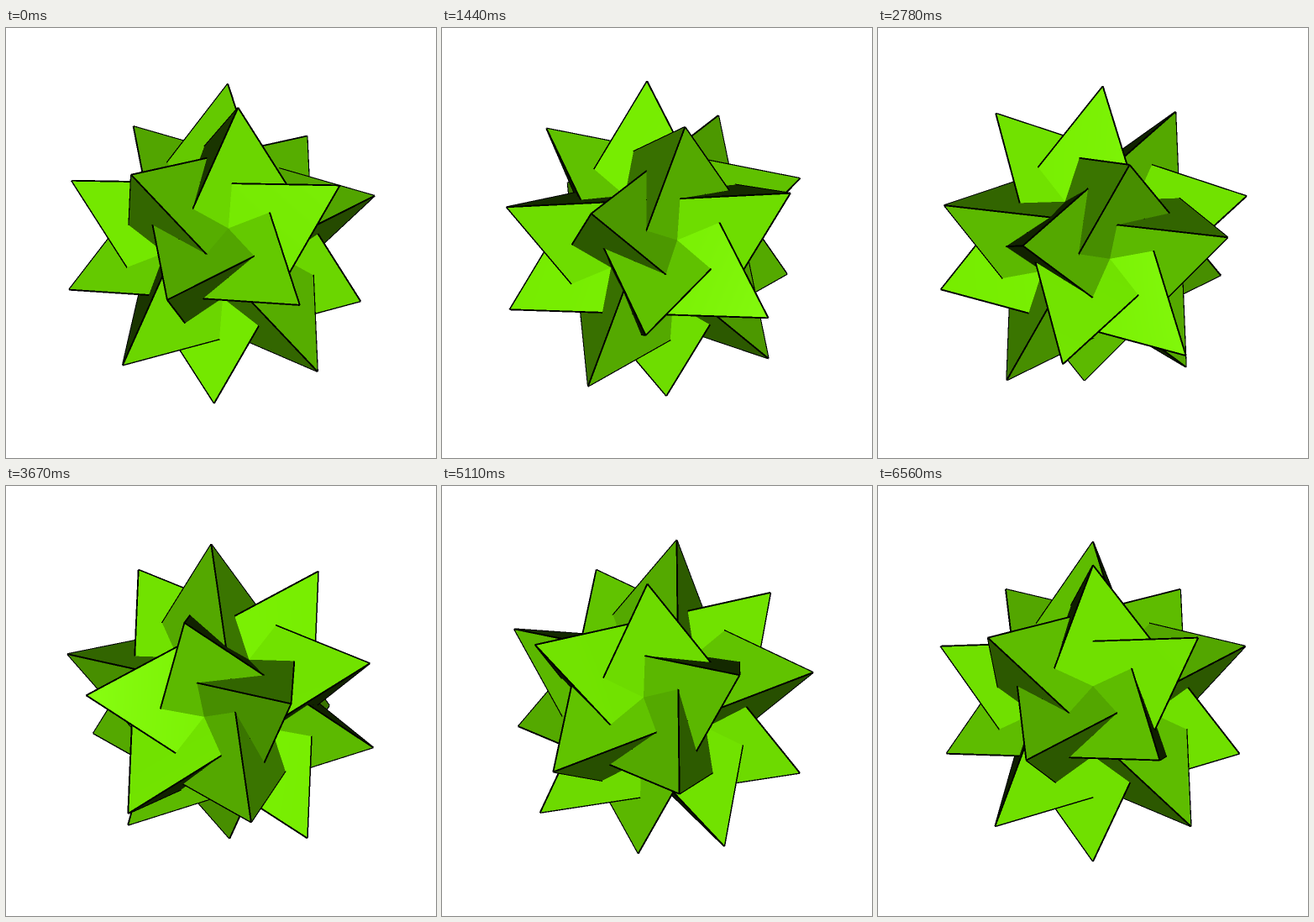
These frames come from a looping animation (512x512 px, 6670 ms). An HTML page with a canvas:

```html
<!DOCTYPE html>
<html lang="en">
<head>
<meta charset="utf-8">
<title>Compound of five tetrahedra</title>
<style>
  html, body { margin: 0; width: 100%; height: 100%; overflow: hidden; background: #fff; }
  canvas { display: block; width: 512px; height: 512px; }
</style>
</head>
<body>
<canvas id="stage" width="512" height="512"></canvas>
<script>
const SIZE = 512, SAMPLES = 2, WIDE = SIZE * SAMPLES;
const LOOP = 6670, STEPS = 60, STEPS_PER_MS = 0.009;
const RADIUS = 190.5, DISTANCE = 6.06, FOCAL = RADIUS * DISTANCE;
const LINE_HALF = 0.95, LINE_BIAS = 1.0002;
const DEG = Math.PI / 180, TILT = 25.18 * DEG, LEAN = 13.283 * DEG;

const stage = document.getElementById('stage').getContext('2d');
const buffer = document.createElement('canvas');
buffer.width = buffer.height = WIDE;
const bufferContext = buffer.getContext('2d');
const image = bufferContext.createImageData(WIDE, WIDE);
const pixels = new Uint32Array(image.data.buffer);
const depth = new Float32Array(WIDE * WIDE);

// The 20 corners lie on four rings around a fivefold axis; each tetrahedron takes one from each.
const high = Math.sqrt((5 + 2 * Math.sqrt(5)) / 15);
const low = Math.sqrt((5 - 2 * Math.sqrt(5)) / 15);
const corners = [[high, 0], [low, -144], [-low, 108], [-high, -36]];

// Corner as [across, outward, along], where "along" is the spin axis.
function corner(height, degrees) {
  const ring = Math.sqrt(1 - height * height);
  const side = ring * Math.sin(degrees * DEG), up = ring * Math.cos(degrees * DEG);
  return [
    side,
    height * Math.cos(LEAN) + up * Math.sin(LEAN),
    up * Math.cos(LEAN) - height * Math.sin(LEAN)
  ];
}

const tetrahedra = [0, 1, 2, 3, 4].map(turn =>
  corners.map(([height, degrees]) => corner(height, degrees + 72 * turn)));

// Spin, then tilt into view space: x right, y down, z towards the viewer.
function rotate([across, outward, along], spin) {
  const c = Math.cos(spin), s = Math.sin(spin);
  const q = c * outward - s * across;
  return [
    c * across + s * outward,
    -(along * Math.cos(TILT) + q * Math.sin(TILT)),
    q * Math.cos(TILT) - along * Math.sin(TILT)
  ];
}

// Screen x and y from the centre, plus nearness, which is linear across the screen.
function project([x, y, z]) {
  const near = FOCAL / (DISTANCE - z);
  return [x * near, y * near, near];
}

const toPixel = v => (v + SIZE / 2) * SAMPLES - 0.5;
const toScreen = p => (p + 0.5) / SAMPLES - SIZE / 2;

// Depth-tested fill of a convex polygon; nearness = a*x + b*y + c.
function fillConvex(points, [a, b, c], colorAt) {
  const ys = points.map(p => toPixel(p[1]));
  const first = Math.max(0, Math.ceil(Math.min(...ys)));
  const last = Math.min(WIDE - 1, Math.floor(Math.max(...ys)));
  for (let row = first; row <= last; row++) {
    const y = toScreen(row);
    let left = Infinity, right = -Infinity;
    points.forEach((p, i) => {
      const q = points[(i + 1) % points.length];
      if ((p[1] <= y) === (q[1] <= y)) return;
      const x = p[0] + (q[0] - p[0]) * (y - p[1]) / (q[1] - p[1]);
      left = Math.min(left, x);
      right = Math.max(right, x);
    });
    if (left > right) continue;
    const end = Math.min(WIDE - 1, Math.floor(toPixel(right)));
    for (let col = Math.max(0, Math.ceil(toPixel(left))); col <= end; col++) {
      const x = toScreen(col), near = a * x + b * y + c, at = row * WIDE + col;
      if (near > depth[at]) {
        depth[at] = near;
        pixels[at] = colorAt(x, y);
      }
    }
  }
}

function pack(diffuse, specular) {
  const r = Math.min(255, diffuse / 2 + specular);
  const g = Math.min(255, diffuse + specular);
  return (0xff000000 | specular << 16 | g << 8 | r) >>> 0;
}

// Green surface lit from the viewer, with a white highlight on faces seen head-on.
function shader([nx, ny, nz]) {
  const diffuse = 255 * Math.max(0, nz);
  const flat = pack(diffuse, 0);
  if (nz < 0.85) return () => flat;
  return (x, y) => {
    const length = Math.hypot(x, y, FOCAL);
    const hx = -x / length, hy = -y / length, hz = FOCAL / length + 1;
    const facing = (nx * hx + ny * hy + nz * hz) / Math.hypot(hx, hy, hz);
    return pack(diffuse, 240 * Math.pow(Math.max(0, facing), 52));
  };
}

function drawFace(normal, points) {
  const [nx, ny, nz] = normal;
  const offset = 1 / 3 - nz * DISTANCE;
  if (offset >= 0) return;
  fillConvex(points, [nx / offset, ny / offset, -nz * FOCAL / offset], shader(normal));
}

const black = () => 0xff000000;

function drawEdge(p, q) {
  const dx = q[0] - p[0], dy = q[1] - p[1], length = Math.hypot(dx, dy);
  if (length < 0.01) return;
  const ox = -dy / length * LINE_HALF, oy = dx / length * LINE_HALF;
  const slope = (q[2] - p[2]) / (length * length);
  const plane = [slope * dx, slope * dy, p[2] - slope * (dx * p[0] + dy * p[1])];
  fillConvex([
    [p[0] + ox, p[1] + oy], [q[0] + ox, q[1] + oy],
    [q[0] - ox, q[1] - oy], [p[0] - ox, p[1] - oy]
  ], plane.map(v => v * LINE_BIAS), black);
}

function draw(step) {
  pixels.fill(0xffffffff);
  depth.fill(0);
  const spin = (step + 1) * 2 * Math.PI / STEPS;
  const solids = tetrahedra.map(solid => solid.map(v => rotate(v, spin)));
  const outlines = solids.map(solid => solid.map(project));

  solids.forEach((solid, s) => solid.forEach((opposite, k) =>
    drawFace(opposite.map(v => -v), outlines[s].filter((_, i) => i !== k))));

  for (const points of outlines)
    for (let i = 0; i < 4; i++)
      for (let j = i + 1; j < 4; j++) drawEdge(points[i], points[j]);

  bufferContext.putImageData(image, 0, 0);
  stage.drawImage(buffer, 0, 0, SIZE, SIZE);
}

let shown = -1;
function tick() {
  const time = performance.now() % LOOP;
  const step = Math.min(STEPS - 1, Math.floor((time + 5) * STEPS_PER_MS));
  if (step !== shown) draw(shown = step);
  requestAnimationFrame(tick);
}
tick();
</script>
</body>
</html>
```
